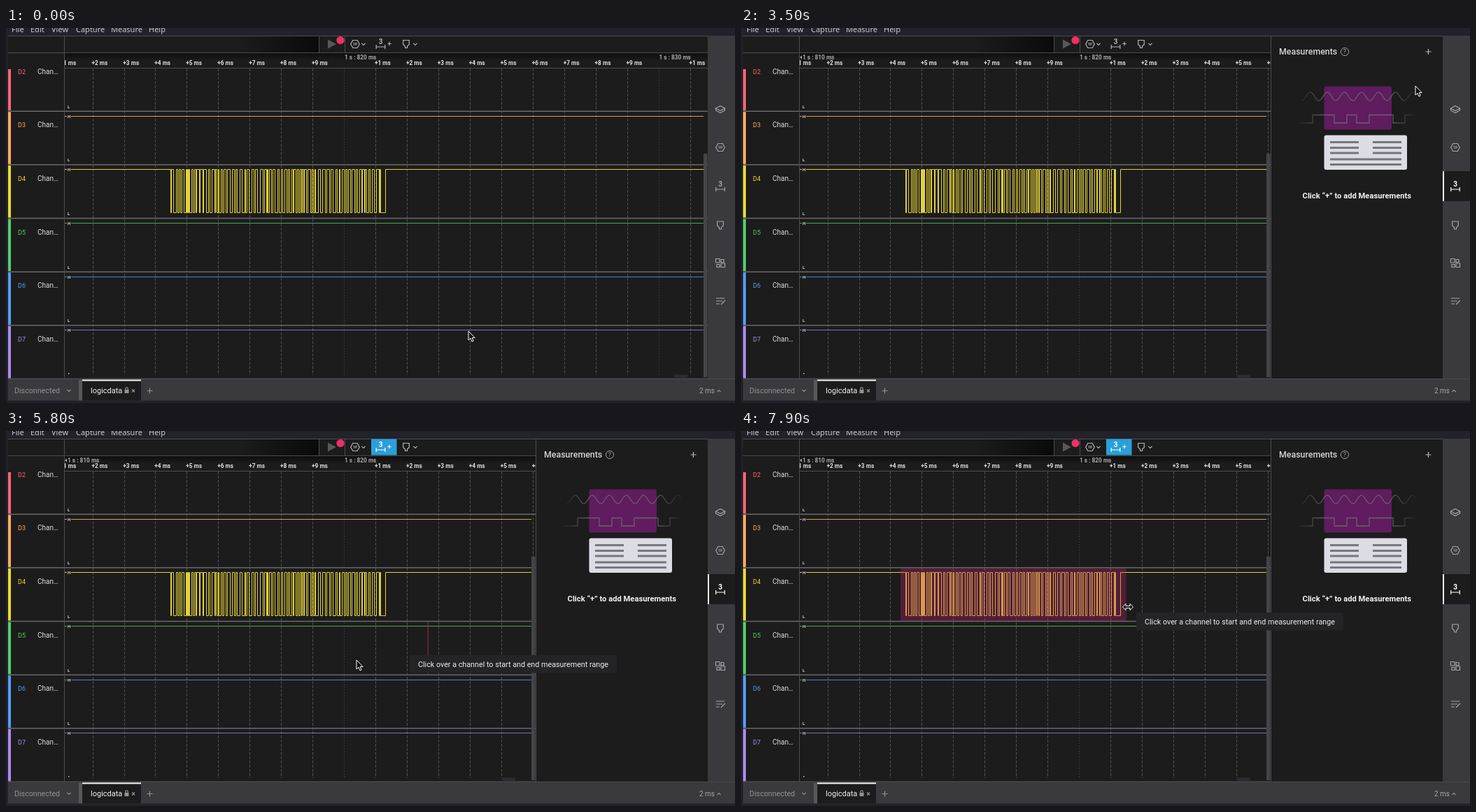
Write an HTML page that moves like this. It is 1042x537 px and loops after 8000 ms.

```html
<!DOCTYPE html>
<html lang="en">
<head>
<meta charset="utf-8">
<title>Logic analyzer</title>
<style>
html, body { margin: 0; width: 100%; height: 100%; overflow: hidden; background: #1c1c1c; }
svg { display: block; width: 100vw; height: 100vh; font-family: Roboto, Arial, sans-serif; }
text { white-space: pre; }
.menu { font: 11px "Noto Sans", sans-serif; fill: #c9c9cd; }
.tick { font-size: 8.3px; font-weight: 700; fill: #dedede; }
.major { font-size: 8.3px; font-weight: 700; fill: #a9a9a9; }
.hl { font-size: 6px; font-weight: 700; fill: #ddd; }
.line { fill: none; stroke: currentColor; stroke-width: 1.2; }
.edge { stroke: #4c4c4f; fill: none; }
.cursor { fill: #111; stroke: #fff; stroke-width: 1; stroke-linejoin: round; }
</style>
</head>
<body>
<svg viewBox="0 0 1042 537" preserveAspectRatio="none">
  <defs>
    <clipPath id="chartClip"><rect id="chartBox" x="84" y="36" height="467"/></clipPath>
    <clipPath id="waveClip"><rect id="waveBox" x="84" y="58" height="445"/></clipPath>
    <linearGradient id="shadeX"><stop stop-opacity="0"/><stop offset="1" stop-opacity=".65"/></linearGradient>
    <linearGradient id="shadeY" x2="0" y2="1"><stop stop-opacity=".5"/><stop offset="1" stop-opacity="0"/></linearGradient>
    <linearGradient id="fade" gradientUnits="userSpaceOnUse" x1="793" x2="968">
      <stop stop-color="#777" stop-opacity="0"/><stop offset=".22" stop-color="#777" stop-opacity=".7"/>
      <stop offset=".78" stop-color="#777" stop-opacity=".7"/><stop offset="1" stop-color="#777" stop-opacity="0"/>
    </linearGradient>
    <g id="hex">
      <path class="line" d="M-3.2-5.5H3.2L6.3 0 3.2 5.5H-3.2L-6.3 0Z"/>
      <text y="2.3" font-size="6" font-weight="700" text-anchor="middle" fill="currentColor">1F</text>
    </g>
    <g id="range">
      <text y="0" font-size="10" font-weight="700" text-anchor="middle" fill="currentColor">3</text>
      <path class="line" d="M-6.3 1V7M6.3 1V7M-6 4H6"/>
    </g>
    <path id="flag" class="line" d="M-4.3-5H4.3V1L1.5 3.6V6H-1.5V3.6L-4.3 1Z"/>
    <path id="chev" class="line" d="M-2.6-1.2 0 1.4 2.6-1.2"/>
    <path id="plus" class="line" d="M-4 0H4M0-4V4"/>
  </defs>

  <rect width="1042" height="537" fill="#1c1c1c"/>
  <rect width="1042" height="11" fill="#22222b"/>
  <g class="menu">
    <text x="8" y="6">File</text><text x="35" y="6">Edit</text><text x="65" y="6">View</text>
    <text x="100" y="6">Capture</text><text x="150" y="6">Measure</text><text x="204" y="6">Help</text>
  </g>

  <g clip-path="url(#chartClip)">
    <g id="grid"></g>
    <path class="edge" d="M84 57.5H1003"/>
    <rect x="84" y="36" width="919" height="11" fill="url(#shadeY)"/>
    <g id="ruler"></g>
    <g id="rows"></g>
  </g>
  <g id="labels"></g>
  <g id="waves" clip-path="url(#waveClip)"></g>
  <rect id="mark" height="76" fill="#be2870"/>
  <path class="edge" d="M83.5 11V503"/>
  <g id="scroll">
    <rect x="997" y="180" width="5.5" height="320" fill="#454548"/>
    <rect x="955" y="496.5" width="19" height="5.5" fill="#2c2c2e"/>
  </g>

  <rect x="330" y="12" width="117" height="23" fill="url(#shadeX)"/>
  <path id="barLine" class="edge"/>
  <path class="edge" d="M3 11.5H1003M447.5 11V35M484.5 11V35"/>
  <path d="M460 16.5 472 23 460 29.5Z" fill="#58585a"/>
  <circle cx="478" cy="17.5" r="5.6" fill="#f22f68"/>
  <rect id="blue" x="522" y="11.5" width="36.5" height="23" fill="#2a9fdb"/>
  <g color="#b4b4b6">
    <use href="#hex" x="499" y="23"/><use href="#chev" x="511" y="23"/>
    <g id="barRange"><use href="#range" x="535.5" y="23"/><path class="line" d="M545.3 22.5H550.7M548 19.8V25.2"/></g>
    <use href="#flag" x="572" y="22.5"/><use href="#chev" x="585" y="23"/>
  </g>

  <g id="panel">
    <rect x="757" y="12" width="246" height="491" fill="#1c1c1c"/>
    <path class="edge" d="M757.5 11V503"/>
    <text x="769" y="38" font-size="12.4" font-weight="500" fill="#d4d4d4">Measurements</text>
    <circle cx="863" cy="34" r="5.6" fill="none" stroke="#999"/>
    <text x="863" y="37.3" font-size="9" text-anchor="middle" fill="#999">?</text>
    <g color="#bbb"><use href="#plus" x="982.5" y="34"/></g>
    <rect x="833.5" y="83.5" width="96.5" height="62" rx="3" fill="#5f1c5f"/>
    <path id="sine" fill="none" stroke="url(#fade)" stroke-width="1.2"/>
    <path fill="none" stroke="url(#fade)" stroke-width="1.3" d="M793 136H817V124.5H848V136H866V124.5H880V136H898V124.5H932V136H949V124.5H967"/>
    <rect x="833.5" y="153.5" width="118.5" height="49.5" rx="3" fill="#dcdce3"/>
    <path stroke="#77777f" stroke-width="3" d="M842 163.5H883M842 171.5H883M842 179H883M903 163.5H944M903 171.5H944M903 179H944M842 188H944M842 195.5H944"/>
    <text x="880.3" y="243.5" font-size="11.2" font-weight="700" fill="#f2f2f2" text-anchor="middle">Click “+” to add Measurements</text>
  </g>

  <rect x="1003" y="11" width="39" height="492" fill="#3a393e"/>
  <g id="active">
    <rect x="1003" y="205" width="39" height="43" fill="#1c1c1c"/>
    <rect x="1003" y="205" width="2" height="43" fill="#fff"/>
  </g>
  <g color="#a4a4a8">
    <path class="line" d="M1014.5 115 1021 111.5 1027.5 115 1021 118.5ZV118L1021 121.5 1027.5 118V115"/>
    <use href="#hex" x="1021" y="171"/>
    <g id="sideRange"><use href="#range" x="1021" y="227"/></g>
    <use href="#flag" x="1021" y="282"/>
    <path class="line" d="M1014.5 330.5H1020V336H1014.500ZM1016 338.500H1020V342.500H1016ZM1022 337H1027.500V342.500H1022ZM1022 331.500H1026V335.500H1022Z"/>
    <path class="line" d="M1015 387H1027M1015 391H1024M1015 395H1020M1022 396 1028 390"/>
  </g>

  <rect y="503" width="1042" height="34" fill="#3a393e"/>
  <path class="edge" d="M3 502.5H1042"/>
  <rect x="104" y="504" width="5" height="29.5" fill="#58585c"/>
  <rect x="109" y="504" width="84" height="29.5" fill="#1c1c1c"/>
  <rect x="109" y="503.5" width="84" height="2" fill="#f4f4f4"/>
  <rect y="533.5" width="1042" height="3.5" fill="#22222b"/>
  <rect y="11" width="3" height="526" fill="#22222b"/>
  <text x="12" y="523" font-size="10.7" fill="#919196">Disconnected</text>
  <text x="121" y="522.5" font-size="11" fill="#f0f0f0">logicdata</text>
  <g color="#929297">
    <use href="#chev" x="90" y="519"/><use href="#plus" x="205.5" y="519.5"/>
    <rect x="169.5" y="518" width="6" height="5" fill="currentColor"/>
    <path class="line" d="M170.8 518V516.5A1.7 1.7 0 0 1 174.2 516.5V518M180 517.5 184 521.5M184 517.5 180 521.5M1016.5 521 1019 518.5 1021.5 521"/>
  </g>
  <text x="991" y="523" font-size="10" fill="#a6a6aa">2 ms</text>

  <g id="sideTip">
    <rect x="919" y="212" width="79.5" height="25" rx="2" fill="#29292b" stroke="#5a5a5d"/>
    <text x="925" y="228" font-size="10" fill="#e4e4e4">Measurements</text>
  </g>
  <g id="menu">
    <rect x="834.5" y="47.5" width="157" height="35" fill="#29292c" stroke="#4a4a4e"/>
    <rect id="hover" x="835" y="51" width="156" height="28" fill="#38383c"/>
    <text x="853" y="68.5" font-size="10" fill="#e4e4e4">Add Measurement</text>
    <text x="951" y="68" font-size="10" fill="#d6d6d6">Ctrl+G</text>
  </g>
  <g id="menuTip">
    <path d="M818 82H907.5L912.5 77 917.5 82H1008V122H818Z" fill="#232325" stroke="#48484b"/>
    <g font-size="10" fill="#dadada">
      <text x="824" y="97.5">Click and drag to select a range or click</text>
      <text x="824" y="111">to start and end a range</text>
    </g>
  </g>
  <g id="hint">
    <rect width="296" height="25.5" rx="2" fill="#242426"/>
    <text x="12" y="16.5" font-size="10.75" fill="#ececec">Click over a channel to start and end measurement range</text>
  </g>
  <path id="arrow" class="cursor" d="M0-1V12L3 9.300 5 14 7.200 13 5.200 8.600H9.200Z"/>
  <path id="hand" class="cursor" d="M-1.200.8Q0-.8 1.200.8V4L5 5Q6.200 5.400 6 7L5 11.500H-1L-4 7.500Q-4.200 6-2.800 6.400L-1.200 7.500Z"/>
  <path id="resize" class="cursor" d="M-7.500 0-3-4.500V-1.500H3V-4.500L7.500 0 3 4.500V1.500H-3V4.500Z"/>
</svg>
<script>
const $ = id => document.getElementById(id);
const put = (id, markup) => { $(id).innerHTML += markup; };
const show = (id, on) => { $(id).style.display = on ? '' : 'none'; };
const move = (id, x, y) => $(id).setAttribute('transform', `translate(${x} ${y})`);

const PITCH = 76.67, TOP = 42.5, MS = 44.95, ORIGIN = 483.7;
const colors = ['#ff6478', '#ffad5c', '#ecd933', '#52cf68', '#559df5', '#ac8cf0'];
const strokes = ['', '#d89a52', '#e2d037', '#46a85a', '#4385d6', '#806fb4'];

// Time ruler and grid
for (let k = -9; k <= 11; k++) {
  const x = ORIGIN + k * MS, n = (k + 10) % 10;
  put('grid', `<path d="M${Math.floor(x) + .5} 58V497" stroke="${n ? '#505050' : '#383838'}" stroke-dasharray="${n ? '4 2' : '2 2'}"/>`);
  put('ruler', n
    ? `<text class="tick" x="${x - 1.7}" y="53">+${n} ms</text>`
    : `<text class="major" x="${x + .3}" y="45">1 s : ${820 + k} ms</text>`);
}
put('ruler', '<g id="early"><text class="major" x="88" y="45">1 s : 810 ms</text><path d="M87 39.5V44.5L84 42Z" fill="#a9a9a9"/></g>');

// Burst of pulses between a high and a low level
function burst(high) {
  const end = 537, low = high + 62;
  let seed = 29, x = 235.5, y = high, d = `M84 ${high}H${x}`;
  const rnd = () => (seed = seed * 16807 % 2147483647) / 2147483647;
  while (x < end) {
    y = y === high ? low : high;
    x += [1, 2, 2, 2, 3, 3, 3, 4][Math.floor(rnd() * 8)];
    d += `V${y}H${x}`;
  }
  return d + `V${low}H542.5V${high}H997`;
}

// Channels
colors.forEach((color, i) => {
  const top = TOP + i * PITCH, bottom = top + PITCH;
  const from = Math.max(top, 58) + 1, high = Math.floor(top + 7) + .5;
  put('labels', `<rect x="3" y="${from}" width="4" height="${bottom - from - 1}" fill="${color}"/>
    <text x="17" y="${top + 23}" font-size="9" fill="${color}">D${i + 2}</text>
    <text x="45" y="${top + 23}" font-size="10" fill="#dcdcdc">Chan…</text>
    <path d="M3 ${bottom}H84" stroke="#69696b" stroke-width="1.5"/>`);
  put('rows', `<path d="M84 ${bottom}H1003" stroke="#69696b" stroke-width="1.5"/>`);
  if (i) put('waves', `<path d="${i === 2 ? burst(high) : `M84 ${high}H997`}" fill="none" stroke="${strokes[i]}"/>
    <rect x="87" y="${high - 3}" width="6" height="6" fill="#1c1c1c"/><text class="hl" x="88" y="${high + 2.3}">H</text>`);
  put('waves', i < 5
    ? `<text class="hl" x="88" y="${bottom - 4.5}">L</text>`
    : '<rect x="89" y="494" width="1.5" height="1.5" fill="#ccc"/>');
});

let sine = '';
for (let x = 802; x <= 967; x++) sine += `${sine ? 'L' : 'M'}${x} ${98 - 6 * Math.cos((x - 838) * Math.PI / 12.2)}`;
$('sine').setAttribute('d', sine);

// Pointer route: time, x, y
const route = [
  [0, 661, 435], [200, 661, 435], [400, 656, 439], [500, 656, 439],
  [700, 694, 424], [800, 764, 392], [1000, 879, 333], [1200, 948, 268], [1400, 978, 227],
  [1600, 1014, 230], [1800, 1023, 233], [2300, 1023, 233],
  [2400, 992, 256], [2600, 947, 283], [2700, 947, 283], [2800, 910, 246], [2900, 910, 246],
  [3200, 926, 186], [3500, 964, 84], [3800, 979, 35], [4400, 979, 35], [4600, 963, 66],
  [5200, 963, 66], [5400, 915, 135], [5600, 690, 270], [5700, 565, 313], [5800, 501, 329],
  [5900, 415, 341], [6100, 241, 278], [6300, 207, 250], [6400, 228, 244], [6700, 228, 244],
  [6900, 237, 244], [7000, 245, 246], [7200, 320, 256], [7400, 440, 264], [7600, 529, 262],
  [7700, 545, 259], [7800, 553, 252], [8000, 553, 252]
];
function at(t) {
  const i = Math.max(1, route.findIndex(p => p[0] >= t));
  const [a, ax, ay] = route[i - 1], [b, bx, by] = route[i];
  const k = (t - a) / (b - a);
  return [ax + (bx - ax) * k, ay + (by - ay) * k];
}
const ramp = (t, a, b) => Math.min(1, Math.max(0, (t - a) / (b - a)));

function draw(t) {
  const open = t >= 1900, measuring = t >= 5400, menu = t >= 4200 && t < 5300;
  const right = open ? 757 : 1003;
  $('chartBox').setAttribute('width', right - 84);
  $('waveBox').setAttribute('width', right - 90);
  $('barLine').setAttribute('d', `M3 35.5H${right}`);
  move('scroll', open ? -246 : 0, 0);
  for (const id of ['panel', 'active', 'early']) show(id, open);
  $('sideRange').style.color = t >= 1600 ? '#fff' : '';
  $('sideTip').style.opacity = ramp(t, 1600, 1900) * (1 - ramp(t, 2300, 2500));

  show('menu', menu);
  show('hover', t >= 4500);
  show('menuTip', menu);
  $('menuTip').style.opacity = ramp(t, 4500, 4700) * .95;
  show('blue', measuring);
  $('barRange').style.color = measuring ? '#fff' : '';

  // The hint and the marker trail the pointer
  const [hx, hy] = at(Math.max(0, t - 100));
  show('hint', t >= 5700);
  move('hint', hx + 12, hy + 8);

  const [mx, my] = at(Math.max(0, t - 130));
  const drag = t >= 6800, row = drag ? 2 : Math.floor((my - TOP) / PITCH);
  const mark = $('mark');
  show('mark', measuring && mx < 751);
  mark.setAttribute('x', drag ? 228 : mx);
  mark.setAttribute('y', TOP + row * PITCH + .7);
  mark.setAttribute('width', drag ? Math.max(1.5, mx - 228) : 1.5);
  mark.style.opacity = drag ? .32 : .55;

  const [x, y] = at(t);
  const kind = t >= 5900 ? 'resize' : (t >= 1600 && t < 2400) || (t >= 3900 && t < 5400) ? 'hand' : 'arrow';
  for (const id of ['arrow', 'hand', 'resize']) {
    show(id, id === kind);
    move(id, x, y);
  }
}

function tick(now) {
  draw(Math.floor(now % 8000 / 100) * 100);
  requestAnimationFrame(tick);
}
draw(0);
requestAnimationFrame(tick);
</script>
</body>
</html>
```
